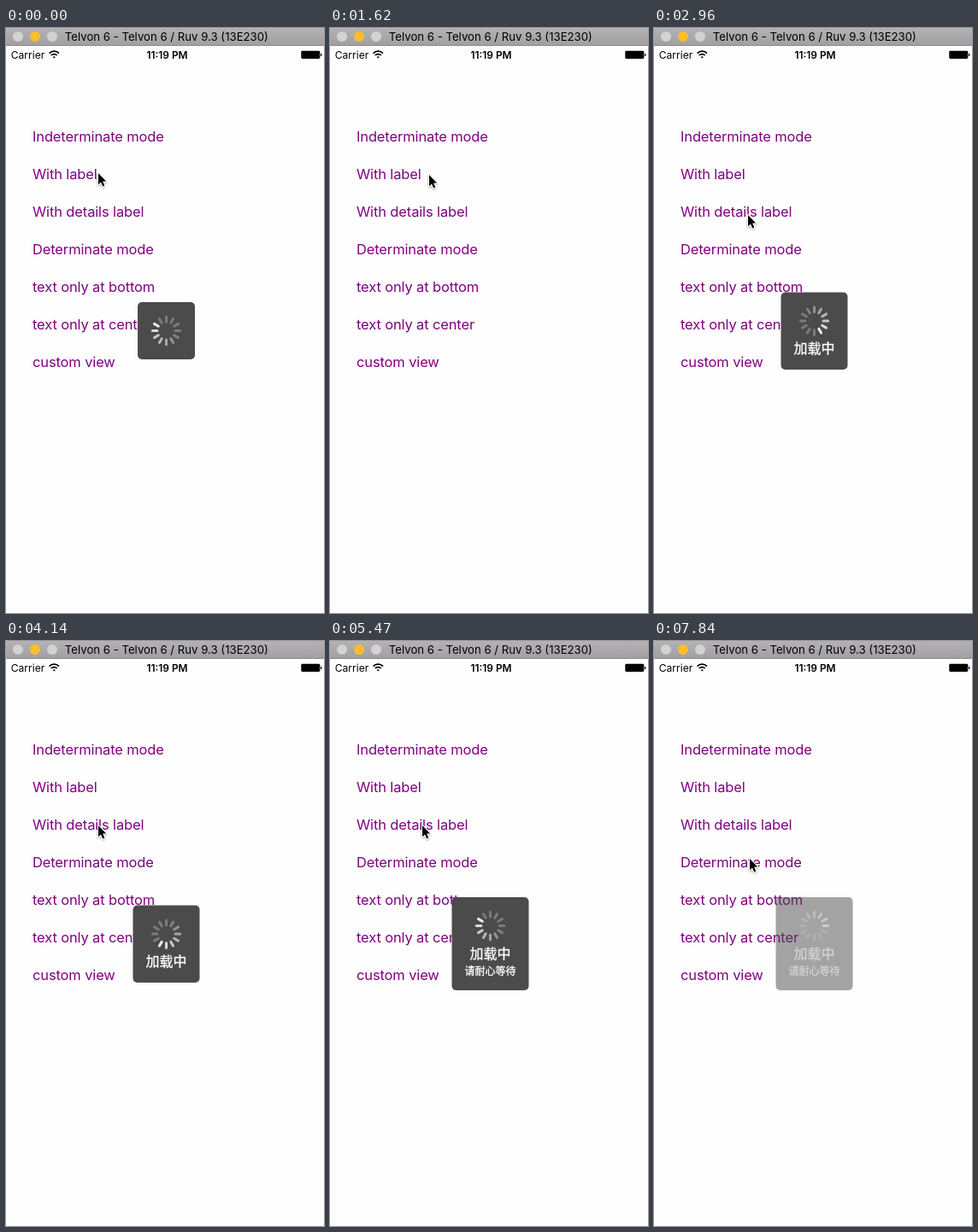
Recreate the animation shown at these times as an HTML page. Size 372 by 685 pixels, loop 7990 ms.

```html
<!DOCTYPE html>
<html lang="en">
<head>
<meta charset="utf-8">
<title>Progress overlay demo</title>
<style>
  html, body { margin: 0; width: 100%; height: 100%; overflow: hidden; background: #fefefe; }
  svg { display: block; width: 372px; height: 685px; font-family: Inter, Roboto, sans-serif; }
  .row { font-size: 16.5px; letter-spacing: -0.14px; fill: #800080; }
  .hud text {
    font-family: "Noto Sans CJK SC", "Noto Sans CJK", sans-serif; font-weight: 500; text-anchor: middle;
    fill: #fff; stroke: #fff; stroke-width: 0.3;
  }
</style>
</head>
<body>
<svg id="stage" viewBox="0 0 372 685" xmlns="http://www.w3.org/2000/svg">
  <defs>
    <linearGradient id="bar" x2="0" y2="1">
      <stop offset="0" stop-color="#b4b2b4"/>
      <stop offset="1" stop-color="#a09ea0"/>
    </linearGradient>
    <filter id="shade" x="-50%" y="-50%" width="200%" height="200%">
      <feDropShadow dx="0" dy="1" stdDeviation="0.8" flood-opacity="0.4"/>
    </filter>
  </defs>
  <rect width="372" height="685" fill="#fefefe"/>

  <rect width="372" height="21" fill="url(#bar)"/>
  <rect y="20" width="372" height="1" fill="#8d8b8d"/>
  <circle cx="14" cy="10" r="6" fill="#d3d2d3"/>
  <circle cx="34" cy="10" r="6" fill="#fdbd2d"/>
  <circle cx="54" cy="10" r="6" fill="#d3d2d3"/>
  <text x="68.8" y="15" font-size="13.2">Telvon 6 - Telvon 6 / Ruv 9.3 (13E230)</text>

  <text x="5.7" y="35.5" font-size="12.1">Carrier</text>
  <g fill="none" stroke="#000" stroke-width="1.7">
    <path d="M50.6 29.6a8 8 0 0 1 11.4 0"/>
    <path d="M52.8 32a4.9 4.9 0 0 1 7 0"/>
    <path d="M56.3 35.6l-1.6 -1.7a2.3 2.3 0 0 1 3.2 0z" fill="#000" stroke="none"/>
  </g>
  <text x="188.5" y="35.5" font-size="11.9" font-weight="600" text-anchor="middle">11:19 PM</text>
  <rect x="345.3" y="26.8" width="22" height="9.2" rx="1.4"/>
  <path d="M368 29.8q1.5 0.4 1.5 1.7t-1.5 1.7z"/>

  <rect id="flash" x="16" y="192" width="343" height="44" fill="#d9d9d9"/>
  <g id="rows"></g>
  <g id="huds"></g>
  <path id="cursor" d="M0 0V13.2L3 10.4L5.2 15.4L7.3 14.5L5.2 9.6H9.2Z" fill="#000"
        stroke="#fff" stroke-width="2" paint-order="stroke" stroke-linejoin="round" filter="url(#shade)"/>
</svg>
<script>
const LOOP = 7990, STEP = 148, LAST = 53, CX = 187.5;
const $ = id => document.getElementById(id);

function add(parent, tag, attrs, text) {
  const el = document.createElementNS("http://www.w3.org/2000/svg", tag);
  for (const name in attrs) el.setAttribute(name, attrs[name]);
  if (text) el.textContent = text;
  parent.appendChild(el);
  return el;
}

["Indeterminate mode", "With label", "With details label", "Determinate mode",
 "text only at bottom", "text only at center", "custom view"]
  .forEach((label, i) => add($("rows"), "text", { class: "row", x: 31, y: 133 + 44 * i }, label));

// first and last: visible steps; head: clock position of the brightest blade at step `at`
const huds = [
  { first: -9, last: 10, box: [154, 321, 67, 67], cy: 354.5, at: 0, head: 10.5, lines: [] },
  { first: 16, last: 33, box: [148.5, 309.5, 78, 90.5], cy: 343, at: 20, head: 5.5,
    lines: [["加载中", 16, 381]] },
  { first: 36, last: 53, box: [142.5, 300, 90, 109], cy: 333.5, at: 37, head: 10.9,
    lines: [["加载中", 16, 371.5], ["请耐心等待", 12, 391]] }
];

for (const hud of huds) {
  const [x, y, width, height] = hud.box;
  hud.group = add($("huds"), "g", { class: "hud" });
  hud.parts = [add(hud.group, "rect", { x, y, width, height, rx: 5, fill: "#4b4b4b" })];
  hud.blades = Array.from({ length: 12 }, (_, i) => add(hud.group, "rect", {
    x: CX - 1.5, y: hud.cy - 17.7, width: 3, height: 8.6, rx: 1.5, fill: "#fff",
    transform: `rotate(${i * 30} ${CX} ${hud.cy})`
  }));
  for (const [text, size, base] of hud.lines)
    hud.parts.push(add(hud.group, "text", { x: CX, y: base, "font-size": size }, text));
}

// pointer stops: step, x, y
const path = [[0, 108, 170], [8, 115, 172], [11, 116, 172], [14, 86, 167], [16, 86, 167],
  [20, 110, 219], [23, 110, 219], [28, 108, 216], [37, 108, 216], [42, 113, 258], [45, 112, 255], [53, 112, 255]];

function pointer(step) {
  const i = Math.max(1, path.findIndex(p => p[0] >= step));
  const [s0, x0, y0] = path[i - 1], [s1, x1, y1] = path[i];
  const u = (step - s0) / (s1 - s0), e = u * u * (3 - 2 * u);
  return [x0 + (x1 - x0) * e, y0 + (y1 - y0) * e].map(Math.round);
}

function fade(hud, step) {
  if (step < hud.first || step > hud.last) return 0;
  return step === hud.first || step === hud.last ? 0.5 : 1;
}

function draw(time) {
  const step = Math.min(LAST, Math.floor((time + 20) / STEP));
  for (const hud of huds) {
    const alpha = fade(hud, step);
    hud.group.style.display = alpha ? "" : "none";
    if (!alpha) continue;
    hud.parts.forEach(part => part.setAttribute("opacity", alpha));
    const head = Math.floor(hud.head + (step - hud.at) * STEP * 0.012);
    hud.blades.forEach((blade, i) => {
      const behind = (((head - i) % 12) + 12) % 12;
      blade.setAttribute("opacity", alpha * Math.max(0.27, 0.9 - 0.1 * behind));
    });
  }
  $("flash").style.display = step === 36 ? "" : "none";
  $("cursor").setAttribute("transform", `translate(${pointer(step)})`);
}

function tick() {
  draw(performance.now() % LOOP);
  requestAnimationFrame(tick);
}
tick();
</script>
</body>
</html>
```
